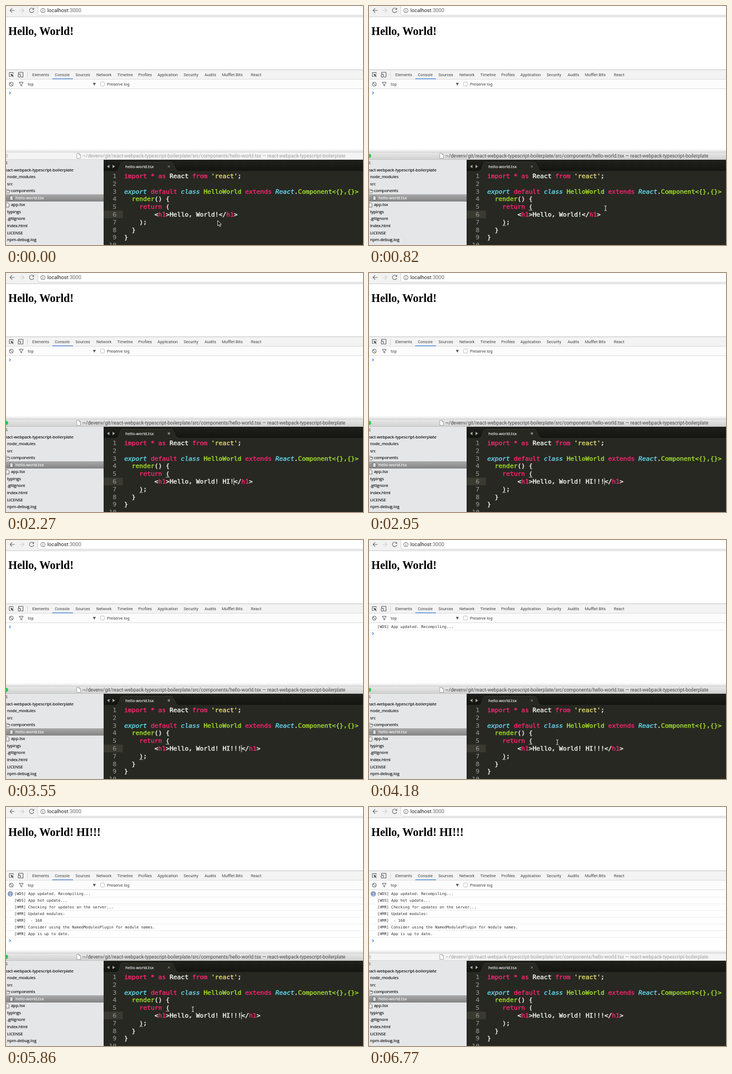
An HTML page that plays this animation: 640 by 429 pixels, repeating every 6810 ms.

```html
<!DOCTYPE html>
<html lang="en">
<head>
<meta charset="utf-8">
<title>Hot reload</title>
<style>
  html, body { margin: 0; width: 100%; height: 100%; overflow: hidden; background: #fff; }
  svg { display: block; width: 640px; height: 429px; }
  text { white-space: pre; }
  .ui { font-family: Roboto, sans-serif; font-size: 7.3px; fill: #444; }
  .url { font-family: Roboto, sans-serif; font-size: 9.27px; fill: #222; }
  .page { font-family: "Liberation Serif", serif; font-size: 20.1px; font-weight: bold; }
  .log { font-family: "DejaVu Sans Mono", monospace; font-size: 6.87px; fill: #303030; }
  .title { font-family: Roboto, sans-serif; font-size: 8.67px; }
  .side { font-family: "Open Sans", sans-serif; font-size: 7.4px; fill: #000; stroke: #000; stroke-width: .12; }
  .side.light { fill: #fff; stroke: #fff; }
  .side.head { fill: #777; stroke: none; font-weight: bold; }
  .code { font-family: "DejaVu Sans Mono", monospace; font-size: 11.26px; fill: #f8f8f2; stroke-width: .4; stroke: #f8f8f2; }
  .num { fill: #8f908a; stroke: #8f908a; stroke-width: .2; }
  .k { fill: #f92672; stroke: #f92672; }
  .c { fill: #66d9ef; stroke: #66d9ef; font-style: italic; }
  .g { fill: #a6e22e; stroke: #a6e22e; }
  .s { fill: #e6db74; stroke: #e6db74; }
</style>
</head>
<body>
<svg id="stage" viewBox="0 0 640 429">
  <defs>
    <linearGradient id="bar" x2="0" y2="1"><stop stop-color="#e9e9e9"/><stop offset="1" stop-color="#d0d0d0"/></linearGradient>
    <linearGradient id="shade" x2="0" y2="1"><stop stop-color="#fff"/><stop offset="1" stop-color="#e4e4e4"/></linearGradient>
    <linearGradient id="pick" x2="0" y2="1"><stop stop-color="#a9a9a9"/><stop offset="1" stop-color="#848484"/></linearGradient>
    <linearGradient id="tabs" x2="0" y2="1"><stop stop-color="#1f201c"/><stop offset="1" stop-color="#141511"/></linearGradient>
  </defs>
  <rect width="640" height="429" fill="#fff"/>

  <g id="browser">
    <rect width="640" height="19" fill="#f2f2f2"/>
    <path d="M640-3H60q-3 0-3 3v13.500q0 3 3 3H640" fill="#fff" stroke="#c4c4c4" stroke-width=".7"/>
    <path d="M0 19.300H640" stroke="#c2c2c2" stroke-width=".8"/>
    <g fill="none" stroke-width="1.1">
      <path d="M15.500 8H7.500M11 4.200L7.200 8L11 11.800" stroke="#6c6c6c"/>
      <path d="M24 8H32M28.500 4.200L32.300 8L28.500 11.800" stroke="#cfcfcf"/>
      <path d="M49 5.200A4 4 0 1 0 49.800 9" stroke="#6c6c6c"/>
      <circle cx="66.200" cy="8.200" r="3.900" stroke="#666" stroke-width=".9"/>
      <path d="M66.200 7.600V10.500M66.200 5.700V6.700" stroke="#666" stroke-width="1"/>
    </g>
    <path d="M50.300 3.200V6.700H46.800Z" fill="#6c6c6c"/>
    <text class="url" x="74" y="11.400">localhost<tspan fill="#666">:3000</tspan></text>
    <text class="page" id="heading" x="4.300" y="51.800"></text>
  </g>

  <g id="devtools">
    <rect y="114" width="640" height="17" fill="#f3f3f3"/>
    <rect y="131" width="640" height="17.500" fill="#fcfcfc"/>
    <path d="M0 114.500H640" stroke="#c4c4c4"/>
    <path d="M0 131.500H640M0 148.500H640" stroke="#d6d6d6" stroke-width=".8"/>
    <path d="M38.500 118V129" stroke="#ccc" stroke-width=".8"/>
    <path d="M83 130.700H120" stroke="#4a86dc" stroke-width="1.300"/>
    <g fill="none" stroke="#5a5a5a" stroke-width="1">
      <path d="M8 126.500H6V119.500H13V121.500"/>
      <path d="M22.500 122V119H30.500V127.500H27M22 122.500H26V127.500H22Z"/>
      <circle cx="9.500" cy="140.300" r="3.500"/><path d="M7 137.800L12 142.800"/>
      <path d="M23.500 137H31L28.200 140.500V143.500L26.300 142.500V140.500Z"/>
    </g>
    <path d="M8.500 121.500L14 124L11.700 124.800L13.600 127L12.700 127.800L10.800 125.500L9.700 127.300Z" fill="#4c4c4c"/>
    <path d="M155.800 138H161L158.400 143Z" fill="#555"/>
    <rect x="169.400" y="136.500" width="7" height="7" rx="1.200" fill="#fff" stroke="#aaa" stroke-width=".7"/>
    <text class="ui" x="39" y="142.600">top</text>
    <text class="ui" x="181" y="142.600">Preserve log</text>
    <g id="messages"></g>
    <g id="badge"><circle cx="7.700" cy="155.900" r="4.700" fill="#8499bd"/><text class="ui" x="7.700" y="158.500" text-anchor="middle" style="fill:#fff">2</text></g>
    <path id="prompt" d="M5.800 153.800L8.200 156L5.800 158.200" fill="none" stroke="#4a86dc" stroke-width="1.200"/>
  </g>

  <rect y="256" width="640" height="6" fill="url(#shade)"/>
  <rect id="titlebar" y="262" width="640" height="14"/>
  <path d="M0 262.300H640M0 275.700H640" stroke="#b8b8b8" stroke-width=".6"/>
  <circle id="light" cx="0" cy="269" r="3.800"/>
  <g id="caption">
    <path d="M127 264.500H131L133.500 267V273.500H127ZM131 264.500V267H133.500" fill="#fff" stroke="#888" stroke-width=".7"/>
    <text class="title" x="137" y="272.200">~/devenv/git/react-webpack-typescript-boilerplate/src/components/hello-world.tsx — react-webpack-typescript-boilerplate</text>
  </g>

  <rect y="276" width="175" height="153" fill="#e5e6e8"/>
  <rect y="338" width="175" height="13" fill="url(#pick)"/>
  <g id="sidebar">
    <path d="M-1 335.500V329H2L3 330H6V331.500M-1 335.500L1 331.500H7.500L5.500 335.500Z" fill="#eee" stroke="#555" stroke-width=".8"/>
    <path d="M7 340.700H10.500L12.500 342.700V348.700H7Z" fill="#ddd" stroke="#555" stroke-width=".8"/>
    <path d="M0 353.200H3.500L5.500 355.200V361H0Z" fill="#eee" stroke="#555" stroke-width=".8"/>
  </g>

  <rect x="175" y="276" width="465" height="153" fill="#272822"/>
  <rect x="175" y="276" width="465" height="20" fill="url(#tabs)"/>
  <path d="M198 296.500C204 296 203 280.500 209 280.500H296C302 280.500 302 296 309 296.500Z" fill="#272822"/>
  <path d="M198 296C204 296 203 280.500 209 280.500H296C302 280.500 302 296 309 296" fill="none" stroke="#42433c" stroke-width=".6"/>
  <path d="M185.500 285V291L181 288ZM191 285V291L195.500 288Z" fill="#a6a7a1"/>
  <text class="side light" x="214" y="290.500">hello-world.tsx</text>
  <path id="close" d="M290.200 286.300L293.800 289.900M293.800 286.300L290.200 289.900" stroke="#8a8b85" stroke-width="1"/>
  <circle id="dirty" cx="292" cy="288" r="2.300" fill="#7b7c76"/>
  <rect x="175" y="367.300" width="34.500" height="13.700" fill="#3a3a31"/>
  <g id="code"></g>
  <path id="brackets" d="M286.500 366.500H293M239 394H245.500" stroke="#c5c5bd" stroke-width=".9"/>
  <path id="caret" d="M0 368V381" stroke="#d8d8d0" stroke-width="1"/>

  <path id="arrow" d="M0 0V9.500L2.200 7.600L3.800 11L5.400 10.300L3.900 7H6.700Z" fill="#111" stroke="#fff" stroke-width=".8"/>
  <path id="ibeam" d="M-2-4.500Q0-4.500 0-3Q0-4.500 2-4.500M0-3.500V3.500M-2 4.500Q0 4.500 0 3Q0 4.500 2 4.500" fill="none" stroke="#ddd"/>
</svg>
<script>
const LOOP = 6810, CHAR = 6.78, CODE_X = 212, LINE = 13.76, ROW = 12;
const FOCUS = 300, SAVE = 3600, BLUR = 6500;
const KEYS = [1500, 1680, 1950, 2180, 2330, 2480];
const HELLO = 'Hello, World!', TYPED = ' HI!!!';
const RECOMPILE = 3700, REPEAT = 4650, RELOAD = 5400;
const LOG = [
  '[WDS] App updated. Recompiling...', '[WDS] App hot update...',
  '[HMR] Checking for updates on the server...', '[HMR] Updated modules:', '[HMR]  - 160',
  '[HMR] Consider using the NamedModulesPlugin for module names.', '[HMR] App is up to date.'
];
// Pointer path: time, x, y
const PATH = [[0, 379.5, 385], [260, 390, 376], [480, 400, 372], [780, 424, 363], [3600, 424, 363],
  [4050, 338, 363], [4600, 335, 363], [5900, 335, 363], [6400, 345, 442]];

const $ = id => document.getElementById(id);
const show = (id, on) => $(id).setAttribute('visibility', on ? 'visible' : 'hidden');
const place = (id, x, y) => $(id).setAttribute('transform', `translate(${x} ${y})`);

function add(parent, tag, attrs, text = '') {
  const node = document.createElementNS('http://www.w3.org/2000/svg', tag);
  for (const name in attrs) node.setAttribute(name, attrs[name]);
  node.textContent = text;
  return $(parent).appendChild(node);
}

[['Elements', 47], ['Console', 87.5], ['Sources', 124.5], ['Network', 162], ['Timeline', 199.5],
 ['Profiles', 237], ['Application', 271.5], ['Security', 318.5], ['Audits', 356],
 ['Mufflet Bits', 387], ['React', 439]].forEach(([label, x]) =>
  add('devtools', 'text', { class: 'ui', x, y: 125.7 }, label));

[['S', -1, 'head'], ['react-webpack-typescript-boilerplate', 121], ['node_modules', 2], ['src', 2],
 ['components', 9], ['hello-world.tsx', 17, 'light'], ['app.tsx', 9], ['typings', 2],
 ['.gitignore', 2], ['index.html', 2], ['LICENSE', 2], ['npm-debug.log', 2]
].forEach(([name, x, style = ''], i) =>
  add('sidebar', 'text', {
    class: 'side ' + style, x, y: 284.3 + i * 12.52, 'text-anchor': i === 1 ? 'end' : 'start'
  }, name));

const rows = LOG.map((line, i) => {
  const y = 155.9 + i * ROW;
  const row = add('messages', 'g', {});
  row.id = 'row' + i;
  add(row.id, 'text', { class: 'log', x: 15, y: y + 2.3 }, line);
  add(row.id, 'path', { d: `M0 ${y + 6}H640`, stroke: '#e8e8e8', 'stroke-width': .8 });
  return row;
});

// Each source line: indent, then [style, text] tokens; the empty token holds the greeting
const SOURCE = [
  [0, ['k', 'import * as'], ['', ' React '], ['k', 'from '], ['s', "'react'"], ['', ';']],
  [0],
  [0, ['c', 'export '], ['k', 'default '], ['c', 'class '], ['g', 'HelloWorld '], ['k', 'extends '],
    ['c', 'React'], ['', '.'], ['g', 'Component<{},{}>']],
  [2, ['g', 'render'], ['', '() {']],
  [4, ['k', 'return '], ['', '(']],
  [8, ['', '<'], ['k', 'h1'], ['', '>'], ['', ''], ['', '</'], ['k', 'h1'], ['', '>']],
  [4, ['', ');']],
  [2, ['', '}']],
  [0, ['', '}']],
  [0]
];
let greeting;
SOURCE.forEach(([indent, ...tokens], i) => {
  const y = 309.2 + i * LINE;
  add('code', 'text', { class: 'code num', x: 198, y, 'text-anchor': 'end' }, i + 1);
  const line = add('code', 'text', { class: 'code', x: CODE_X + indent * CHAR, y });
  line.id = 'line' + i;
  tokens.forEach(([style, text]) => {
    const span = add(line.id, 'tspan', { class: style }, text);
    if (!text) greeting = span;
  });
});

function pointerAt(t) {
  const next = PATH.findIndex(p => p[0] > t);
  if (next < 0) return PATH[PATH.length - 1].slice(1);
  const [t0, x0, y0] = PATH[next - 1], [t1, x1, y1] = PATH[next];
  const u = (t - t0) / (t1 - t0), e = u * u * (3 - 2 * u);
  return [x0 + (x1 - x0) * e, y0 + (y1 - y0) * e];
}

function render(t) {
  const focused = t >= FOCUS && t < BLUR;
  const typed = KEYS.filter(k => k <= t).length;
  greeting.textContent = HELLO + TYPED.slice(0, typed);
  $('heading').textContent = t >= RELOAD ? HELLO + TYPED : HELLO;

  $('titlebar').setAttribute('fill', focused ? 'url(#bar)' : '#f4f4f4');
  $('light').setAttribute('fill', focused ? '#2bc840' : '#d4d4d4');
  $('caption').setAttribute('fill', focused ? '#4a4a4a' : '#a0a0a0');

  const dirty = typed > 0 && t < SAVE;
  show('dirty', dirty);
  show('close', !dirty);
  show('brackets', focused);

  const lastInput = typed ? KEYS[typed - 1] : FOCUS;
  show('caret', focused && Math.floor((t - lastInput) / 500) % 2 === 0);
  place('caret', CODE_X + (8 + 4 + HELLO.length + typed) * CHAR, 0);

  const count = t < RECOMPILE ? 0 : t < RELOAD ? 1 : LOG.length;
  rows.forEach((row, i) => show(row.id, i < count));
  show('badge', t >= REPEAT);
  place('prompt', 0, count * ROW);

  const [x, y] = pointerAt(t);
  const hidden = t >= KEYS[0] && t < SAVE;
  show('arrow', !focused);
  show('ibeam', focused && !hidden);
  place('arrow', x, y);
  place('ibeam', x, y);
}

const start = performance.now();
function tick() {
  render((performance.now() - start) % LOOP);
  requestAnimationFrame(tick);
}
tick();
</script>
</body>
</html>
```
